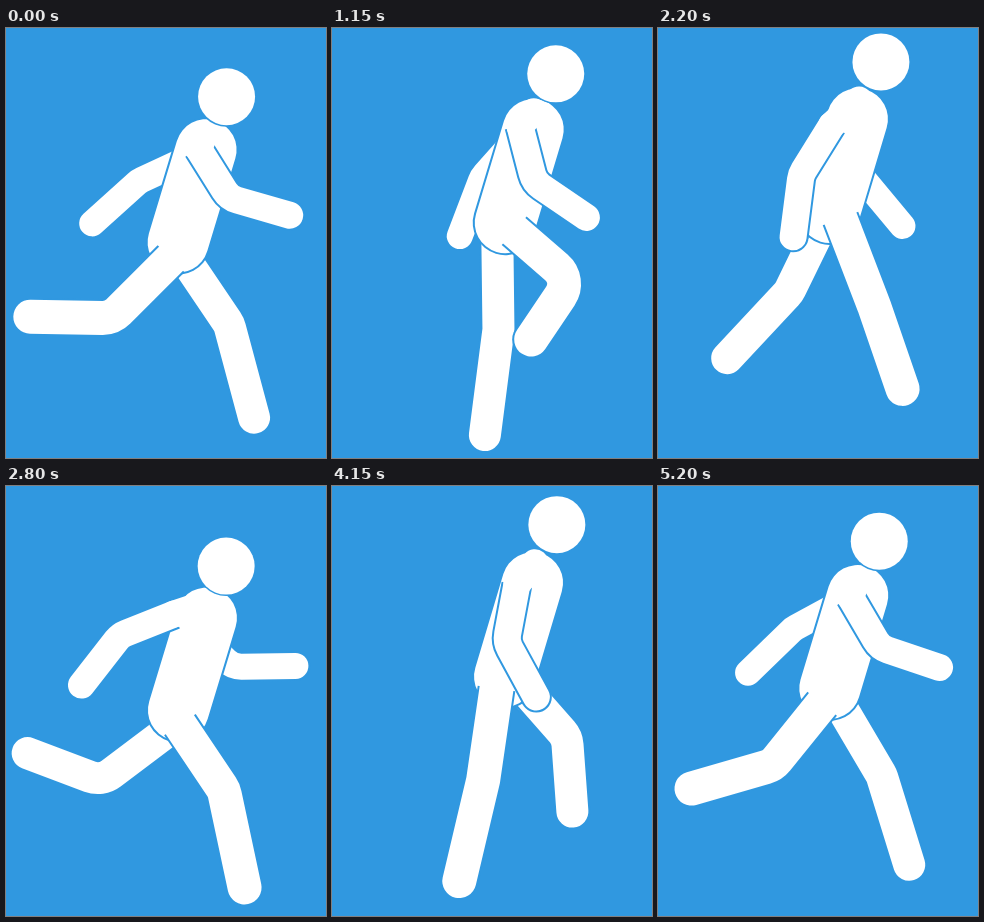
An HTML page with a canvas for the animation above (5.35 s loop, 320 by 430 pixels).

```html
<!DOCTYPE html>
<html lang="en">
<head>
<meta charset="utf-8">
<title>Running figure</title>
<style>
html, body { margin: 0; width: 100%; height: 100%; overflow: hidden; background: #3098e0; }
canvas { display: block; }
</style>
</head>
<body>
<canvas id="stage" width="320" height="430"></canvas>
<script>
const BLUE = '#3098e0', WHITE = '#fff';
const LOOP = 5350, STEP = 150, POSES = 36, HALF = POSES / 2;
const ctx = document.getElementById('stage').getContext('2d');
ctx.lineJoin = 'round';

// Limb angles in degrees, 0 hanging down and positive forward, evenly spread over one cycle.
const leg = {
  upper: [-45, -56, 34, 48, 22, 21, 34, 28, 11, -4, -16, -26],
  lower: [-91, -140, -96, -8, 12, 19, 15, 5, -3, -10, -22, -43]
};
const nearArm = {
  upper: [32, 16, 6, -66, -46, 6],
  lower: [74, 63, 32, -38, 0, 42]
};
const farArm = {
  upper: [46, 5, -25, -65, -48, -22],
  lower: [85, 80, -10, -48, -24, -8]
};

// Cosine that repeats a number of times per cycle and peaks at the given pose.
const wave = (t, repeats, peak) => Math.cos(2 * Math.PI * repeats * (t - peak) / POSES);

// Closed Catmull-Rom curve through evenly spaced values.
function spline(values, t) {
  const n = values.length, s = t / POSES * n, i = Math.floor(s), u = s - i;
  const [a, b, c, d] = [-1, 0, 1, 2].map(k => values[(i + k + n) % n]);
  return b + u / 2 * (c - a + u * (2 * a - 5 * b + 4 * c - d + u * (3 * (b - c) + d - a)));
}

function reach([x, y], length, degrees) {
  const angle = degrees * Math.PI / 180;
  return [x + length * Math.sin(angle), y + length * Math.cos(angle)];
}

function joints(start, angles, t, upperLength, lowerLength) {
  const middle = reach(start, upperLength, spline(angles.upper, t));
  return [start, middle, reach(middle, lowerLength, spline(angles.lower, t))];
}

function legJoints(t) {
  const sway = wave(t, 1, 12);
  const hip = [-50 + 11 * sway, 160 - 4 * sway];
  return joints(hip, leg, t, 84 + 10 * wave(t, 3, 3), 89 + 18 * wave(t, 1, 24.5));
}

const armJoints = (shoulder, angles, t) => joints(shoulder, angles, t, 58, 63);

function disc([x, y], r, color) {
  ctx.fillStyle = color;
  ctx.beginPath();
  ctx.arc(x, y, r, 0, 7);
  ctx.fill();
}

function line(points, width, color, cap) {
  const [start, ...rest] = points, end = rest.pop();
  ctx.strokeStyle = color;
  ctx.lineWidth = width;
  ctx.lineCap = cap;
  ctx.beginPath();
  ctx.moveTo(...start);
  for (const bend of rest) ctx.arcTo(...bend, ...end, 22);
  ctx.lineTo(...end);
  ctx.stroke();
}

// The outline stays open where the limb joins the body.
function limb(points, width) {
  line(points, width + 4, BLUE, 'butt');
  disc(points[2], width / 2 + 2, BLUE);
  line(points, width, WHITE, 'round');
}

function draw(t) {
  const other = (t + HALF) % POSES, bob = wave(t, 2, 3);
  ctx.fillStyle = BLUE;
  ctx.fillRect(0, 0, 320, 430);
  ctx.save();
  ctx.translate(222.5 - 2.5 * wave(t, 2, 2), 54 + 27 * bob + 7 * wave(t, 4, 2));

  limb(armJoints([-35, 60], farArm, other), 26);
  limb(legJoints(other), 32);

  const torso = [[-22 + 3 * bob, 55 - 4 * bob], [-50 + 3 * bob, 148 - 5 * bob]];
  line(torso, 65, BLUE, 'round');
  line(torso, 61, WHITE, 'round');

  limb(legJoints(t), 34);
  const shoulder = [-40 + 12 * wave(t, 1, 1), 54 - 12 * wave(t, 2, 4)];
  limb(armJoints(shoulder, nearArm, t), 27);
  line([shoulder, [-22, 38]], 27, WHITE, 'round');

  disc([0, 0], 30, BLUE);
  disc([0, 0], 28.5, WHITE);
  ctx.restore();
}

function tick(now) {
  const t = now % LOOP;
  // One pose early in the run is 50 ms shorter than the rest.
  draw(Math.floor((t < 1150 ? t : t + 50) / STEP));
  requestAnimationFrame(tick);
}
requestAnimationFrame(tick);
</script>
</body>
</html>
```
